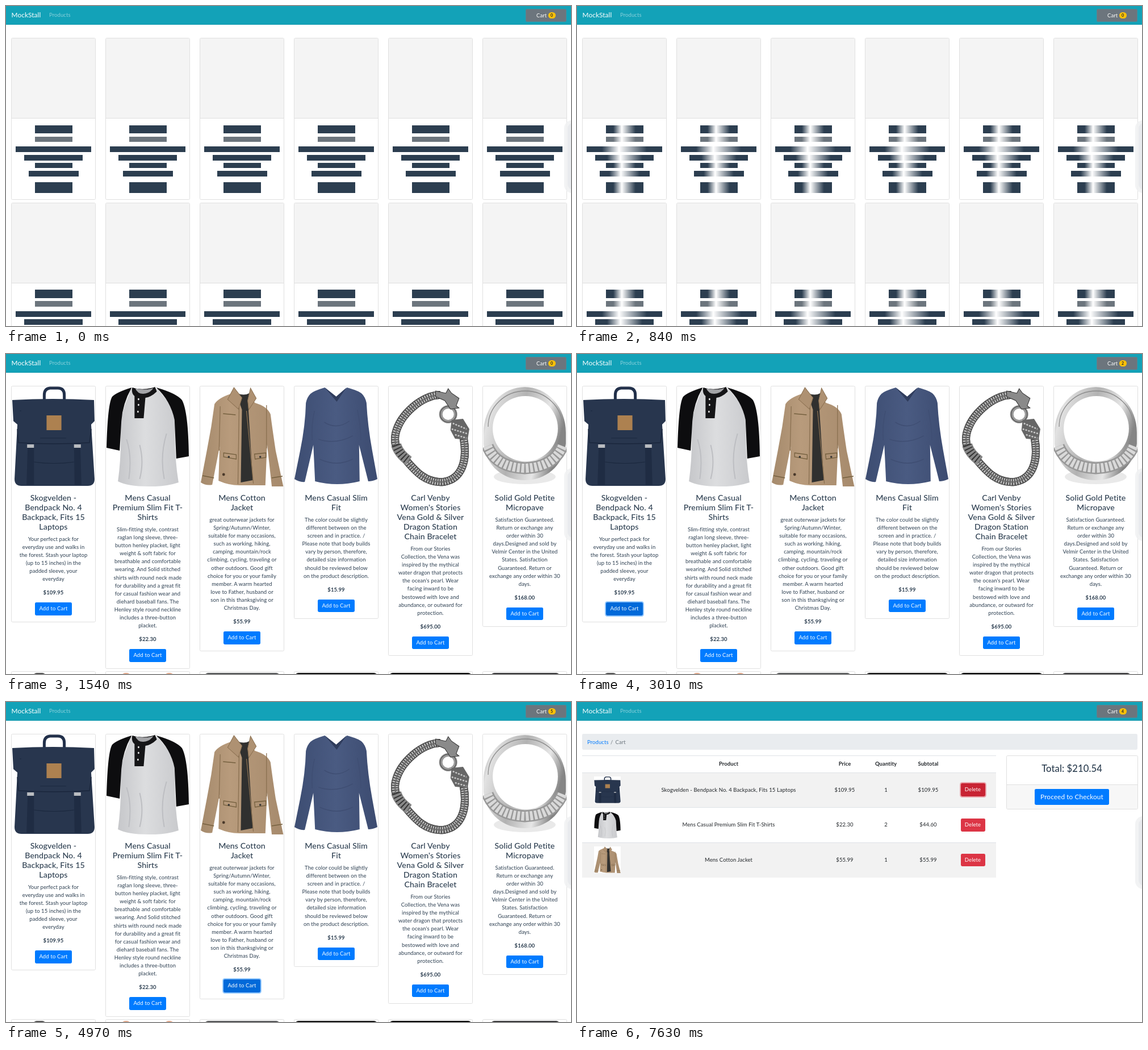
An HTML page that plays this animation: 995x563 px, repeating every 8 s.

```html
<!DOCTYPE html>
<html lang="en">
<head>
<meta charset="utf-8">
<title>Shop demo</title>
<style>
html, body { margin: 0; width: 100%; height: 100%; overflow: hidden; background: #fff; }
body { position: relative; font: 9.47px/14.1px Lato, "Open Sans", sans-serif; letter-spacing: .01em; color: #2c3e50; }
body *, body *::after { box-sizing: border-box; }
.at, .view, .card, .photo, .bar { position: absolute; }
.at { white-space: pre; }
.mid { text-align: center; }
.bold { font-weight: bold; }
.view { inset: 0; }

/* navigation */
#nav { left: 0; top: 0; width: 100%; height: 33px; background: #13a2b8; border-bottom: 1px solid #1699ad; }
#brand { left: 9.5px; top: 9px; font-size: 11.84px; color: #fff; }
#link { left: 76px; top: 9px; color: rgba(255,255,255,.5); }
.btn { color: #fff; border-radius: 2.4px; text-align: center; white-space: pre; }
#cart { position: absolute; left: 915px; top: 5px; width: 72px; height: 23px; line-height: 21px; border: 1px solid #588592; background: #6c757d; animation: cartBtn 8s linear infinite; }
#cart span { position: absolute; left: 18px; }
#badge { position: absolute; left: 38.5px; top: 5px; width: 13px; height: 11px; overflow: hidden; border-radius: 6px; background: #ffc107; color: #212529; font: bold 7.1px/11px Lato, sans-serif; }
#badge div { white-space: pre; animation: count 8s step-end infinite; }
@keyframes count {
  0% { transform: translateY(0); }
  33.25% { transform: translateY(-11px); }
  35.875% { transform: translateY(-22px); }
  48.125% { transform: translateY(-33px); }
  50.75% { transform: translateY(-44px); }
  61.25% { transform: translateY(-55px); }
  93.625%, 100% { transform: translateY(-66px); }
}

/* the three screens */
#loading { animation: loading 8s step-end infinite; }
#shop { animation: shop 8s step-end infinite; }
#order { animation: order 8s step-end infinite; }
@keyframes loading { 0% { opacity: 1; } 14.875%, 100% { opacity: 0; } }
@keyframes shop { 0% { opacity: 0; } 14.875% { opacity: 1; } 76.125%, 100% { opacity: 0; } }
@keyframes order { 0% { opacity: 0; } 76.125%, 100% { opacity: 1; } }

/* cards */
.card { width: 149px; border: 1px solid #e0e0e0; border-radius: 2.4px; background: #fff; overflow: hidden; text-align: center; white-space: pre; }
.blank { position: absolute; left: 0; top: 0; width: 100%; height: 141px; background: #f4f4f4; border-bottom: 1px solid #dfdfdf; }
.bar { overflow: hidden; background: #2c3e50; }
.bar.grey { background: #6c757d; }
.bar::after { content: ""; position: absolute; top: 0; height: 100%; width: 60%; background: linear-gradient(90deg, rgba(255,255,255,0), #fff 38%, rgba(255,255,255,0)); animation: sweep 8s infinite; }
@keyframes sweep {
  0% { left: -60%; animation-timing-function: step-end; }
  5.25% { left: -55%; animation-timing-function: steps(11, end); }
  14.875%, 100% { left: 82.5%; }
}
.item { padding: 187px 0 11px; }
.item .photo { left: 0; top: 0; width: 147px; height: 176px; }
.item h4 { margin: 0 0 7px; font: 500 14.2px/17px Lato, "Open Sans", sans-serif; }
.item p { margin: 0 0 9.9px; }
.item .btn { display: inline-block; padding: 0 7.3px; height: 22.5px; line-height: 22.5px; background: #007bff; vertical-align: top; letter-spacing: .018em; }
.buy0 { animation: buy0 8s linear infinite; }
.buy1 { animation: buy1 8s linear infinite; }
.buy2 { animation: buy2 8s linear infinite; }
@keyframes buy0 {
  0%, 28% { background: #007bff; box-shadow: 0 0 0 0 rgba(38,143,255,.5); }
  29.75%, 32.375% { background: #0069d9; box-shadow: 0 0 0 0 rgba(38,143,255,.5); }
  34.25%, 38.5% { background: #0069d9; box-shadow: 0 0 0 1.9px rgba(38,143,255,.5); }
  39.375%, 47.25% { background: #007bff; box-shadow: 0 0 0 1.9px rgba(38,143,255,.5); }
  49.125%, 100% { background: #007bff; box-shadow: 0 0 0 0 rgba(38,143,255,.5); }
}
@keyframes buy1 {
  0%, 42% { background: #007bff; box-shadow: 0 0 0 0 rgba(38,143,255,.5); }
  43.75%, 47.25% { background: #0069d9; box-shadow: 0 0 0 0 rgba(38,143,255,.5); }
  49.125%, 51.625% { background: #0069d9; box-shadow: 0 0 0 1.9px rgba(38,143,255,.5); }
  52.5%, 60.375% { background: #007bff; box-shadow: 0 0 0 1.9px rgba(38,143,255,.5); }
  62.125%, 100% { background: #007bff; box-shadow: 0 0 0 0 rgba(38,143,255,.5); }
}
@keyframes buy2 {
  0%, 56% { background: #007bff; box-shadow: 0 0 0 0 rgba(38,143,255,.5); }
  57.75%, 60.375% { background: #0069d9; box-shadow: 0 0 0 0 rgba(38,143,255,.5); }
  62.125%, 74.375% { background: #0069d9; box-shadow: 0 0 0 1.9px rgba(38,143,255,.5); }
  76.125%, 100% { background: #007bff; box-shadow: 0 0 0 0 rgba(38,143,255,.5); }
}
@keyframes cartBtn {
  0%, 74.375% { background: #6c757d; box-shadow: 0 0 0 0 rgba(130,138,145,.5); }
  76.125%, 80.5% { background: #5a6268; box-shadow: 0 0 0 1.9px rgba(130,138,145,.5); }
  82.25%, 92.75% { background: #6c757d; box-shadow: 0 0 0 1.9px rgba(130,138,145,.5); }
  94.5%, 100% { background: #6c757d; box-shadow: 0 0 0 0 rgba(130,138,145,.5); }
}

/* cart screen */
#order { color: #212529; }
#crumbs { left: 9px; top: 56px; width: 978px; height: 28px; border-radius: 2.4px; background: #e9ecef; }
.row { left: 9px; width: 729px; height: 62px; border-top: 1px solid #dee2e6; }
.odd { background: #f2f2f2; }
.del { position: absolute; left: 675.5px; width: 43px; height: 22.5px; line-height: 22.5px; background: #dc3545; }
.del0 { animation: del0 8s linear infinite; }
@keyframes del0 {
  0%, 84% { background: #dc3545; box-shadow: 0 0 0 0 rgba(225,83,97,.5); }
  85.75%, 92.75% { background: #c82333; box-shadow: 0 0 0 0 rgba(225,83,97,.5); }
  94.5%, 100% { background: #c82333; box-shadow: 0 0 0 1.9px rgba(225,83,97,.5); }
}
.was { animation: was 8s step-end infinite; }
.now { animation: now 8s step-end infinite; }
@keyframes was { 0% { opacity: 1; } 93.625%, 100% { opacity: 0; } }
@keyframes now { 0% { opacity: 0; } 93.625%, 100% { opacity: 1; } }
#sum { left: 756px; top: 94px; width: 232px; height: 95px; border: 1px solid #dfdfdf; border-radius: 2.4px; overflow: hidden; }
#sum div { position: absolute; left: 0; top: 50px; width: 100%; height: 44px; background: #f7f7f7; border-top: 1px solid #dfdfdf; }
.total { font-size: 16.6px; font-weight: 500; color: #2c3e50; }
#pay { position: absolute; left: 806px; top: 153px; width: 131px; height: 28.4px; line-height: 28px; font-size: 11.84px; background: #007bff; }

/* panel peeking in from the right edge */
#edge { left: 983px; top: 201px; width: 30px; height: 128px; border-radius: 14px; background: rgba(240,241,242,.85); }
#edge::after { content: ""; position: absolute; left: 6px; top: 5px; width: 30px; height: 117px; border-radius: 9px; background: #e9ebee; }
</style>
</head>
<body>
<svg width="0" height="0" style="position:absolute">
  <defs>
    <linearGradient id="silver" x1="0" x2="1" y1="0" y2=".3">
      <stop offset="0" stop-color="#8d8d8d"/><stop offset=".15" stop-color="#e2e2e2"/><stop offset=".5" stop-color="#b2b2b2"/>
      <stop offset=".8" stop-color="#e6e6e6"/><stop offset="1" stop-color="#858585"/>
    </linearGradient>
    <linearGradient id="cloth" x1="0" x2="1">
      <stop offset="0" stop-color="#c6c7ca"/><stop offset=".45" stop-color="#dcdddf"/><stop offset="1" stop-color="#c9cacd"/>
    </linearGradient>
    <linearGradient id="blue" x1="0" x2="1">
      <stop offset="0" stop-color="#3d4d72"/><stop offset=".5" stop-color="#4a5b82"/><stop offset="1" stop-color="#3c4b70"/>
    </linearGradient>
    <linearGradient id="tan" x1="0" x2="1">
      <stop offset="0" stop-color="#a58a6c"/><stop offset=".35" stop-color="#b89b7c"/><stop offset="1" stop-color="#a68a6c"/>
    </linearGradient>
    <symbol id="p0" viewBox="10 57 146 176" preserveAspectRatio="none">
      <path d="M67 84V72q0-11 10-12h14q11 0 11 12v12" fill="none" stroke="#22304a" stroke-width="5"/>
      <path d="M11 81q71-4 143 0l1 37-6 6 6 96q0 12-12 12H27q-12 0-12-12l5-96-7-6z" fill="#28364e"/>
      <path d="M20 132l2 24q60 4 124 0l3-24" fill="none" stroke="#1a263c" stroke-width="1.5"/>
      <path d="M38 160h11v70H36zM119 160h11l2 70h-12z" fill="#1f2c43"/>
      <path d="M49 190q35 5 70 0M24 100h3M60 148h45" fill="none" stroke="#1b283e"/>
      <path d="M37 159h12v6H37zM119 159h12v6h-12z" fill="#b9bcc0"/>
      <rect x="71" y="108" width="26" height="26" fill="#ad8150"/>
    </symbol>
    <symbol id="p1" viewBox="176 57 146 176" preserveAspectRatio="none">
      <path d="M220 61q20 10 46 0l22 27 9 30q-2 60 6 108-24 8-53 7-36 0-53-9 7-50 4-106l8-28z" fill="url(#cloth)"/>
      <path d="M221 59q-26 8-34 16-8 12-10 90l23 5 3-52q2-30 18-59zM264 59q35 10 45 22 11 20 12 99l-22 4-3-68q-7-34-32-57z" fill="#0d0d0f"/>
      <path d="M222 59q18 6 40-1l3 8q-10 10-20 11l-3 36h-16V74q-6-5-4-15z" fill="#151517"/>
      <path d="M227 60q16 5 32 0-6 9-18 10-10 0-14-10z" fill="#a4a5a8"/>
      <path d="M233 79v1M233 89v1M232 101v1" stroke="#eee" stroke-width="2.5" stroke-linecap="round"/>
      <path d="M212 150q10 30 4 70M282 140q-12 40-4 80M235 160q8 30 0 60" fill="none" stroke="#bdbec2" stroke-width="2"/>
    </symbol>
    <symbol id="p2" viewBox="342 57 146 176" preserveAspectRatio="none">
      <path d="M396 70q-22 7-29 18-5 40-13 80l-11 58q9 6 20 4l13-67-2 60q18 8 36 8h46l3-72 9 81q11 2 20-4l-14-66q-6-40-9-64-6-14-27-20l-9-10q-18-4-33-6z" fill="url(#tan)"/>
      <path d="M405 68q13 7 25 0l-4 24 8 130-21 4 2-128z" fill="#30302f"/>
      <path d="M401 59l-11 21 19 17 6-20zM430 60l10 18-13 20-2-16z" fill="#ae9172" stroke="#8c7152"/>
      <path d="M377 92l-2 78M458 90v76M423 100l12 128M410 94l-2 135" fill="none" stroke="#8a7051" stroke-width="1.3"/>
      <path d="M382 105l22 2M383 174l22 3v8l-22-4zM437 176l20-2v8l-19 3zM346 214l20 4M467 218l19-3" fill="none" stroke="#75603f" stroke-width="1.3"/>
      <circle cx="392" cy="181" r="1.8" fill="#333"/><circle cx="447" cy="181" r="1.8" fill="#333"/><circle cx="383" cy="212" r="2.4" fill="#4a392a"/>
    </symbol>
    <symbol id="p3" viewBox="508 57 146 176" preserveAspectRatio="none">
      <path d="M561 59q-20 6-25 11-6 6-8 16-1 40-10 84l-10 50q9 6 18 5l15-65 3 64q38 10 78 0l-1-64 16 64q8 0 16-4l-9-50q-8-44-10-84-2-10-8-16-5-5-26-11l-19 16z" fill="url(#blue)"/>
      <path d="M561 59l20 16 18-16-17 25z" fill="#303d5d"/>
      <path d="M543 100q-6 26-4 52M618 98q6 28 6 54M550 150q30 10 60-6M552 185q30 14 58 0M560 120q22 14 44-2" fill="none" stroke="#3f4e73" stroke-width="1.5"/>
    </symbol>
    <symbol id="p4" viewBox="674 57 146 176" preserveAspectRatio="none">
      <g fill="none">
        <path id="chain" d="M764 72c-30 0-70 33-78 68-4 20 4 32 14 42 16 18 35 46 70 43 32-5 42-37 35-77" stroke="#4f4f4f" stroke-width="14"/>
        <use href="#chain" style="stroke:#bbb"/>
        <path d="M764 72c-30 0-70 33-78 68-4 20 4 32 14 42 16 18 35 46 70 43 32-5 42-37 35-77" stroke="#bdbdbd" stroke-width="11" stroke-dasharray="2.2 2"/>
        <path d="M764 72c-30 0-70 33-78 68-4 20 4 32 14 42 16 18 35 46 70 43 32-5 42-37 35-77" stroke="#6a6a6a" stroke-width="2"/>
        <path d="M687 160q5 16 22 28" stroke="#888" stroke-width="18"/>
        <path d="M687 160q5 16 22 28" stroke="#333" stroke-width="15" stroke-dasharray="2 4"/>
        <circle cx="778" cy="106" r="13" stroke="#999" stroke-width="6"/>
        <circle cx="778" cy="106" r="14" stroke="#444"/>
      </g>
      <path d="M756 65l18 4 4-8 6 8 13 9-5 13 5 4-15 2-10-15-16-7z" fill="#8a8a8a" stroke="#333"/>
      <path d="M784 116l20-2 11 18-3 19-22-2-8-15z" fill="#666"/>
      <path d="M786 122l24 10M784 132l27 8M790 142l20 6" stroke="#c9c9c9" stroke-width="2.5" stroke-dasharray="3 2"/>
    </symbol>
    <symbol id="p5" viewBox="840 57 146 176" preserveAspectRatio="none">
      <ellipse cx="913" cy="216" rx="54" ry="13" fill="#e9e9e9"/>
      <path fill-rule="evenodd" d="M841 138a72 80 0 0 1 144 0v20c-5 40-36 64-72 64s-68-24-72-64zM857 131a57 58 0 0 0 114 0 57 57 0 0 0-114 0z" fill="url(#silver)"/>
      <path d="M849 128a65 63 0 0 1 130 0" fill="none" stroke="#8c8c8c" stroke-width="1.3"/>
      <path d="M848 162q14 37 65 39 51-2 66-39" fill="none" stroke="#989898" stroke-width="21"/>
      <path d="M848 162q14 37 65 39 51-2 66-39" fill="none" stroke="#d9d9d9" stroke-width="16" stroke-dasharray="5 2.5"/>
    </symbol>
  </defs>
</svg>

<div id="loading" class="view"></div>
<div id="shop" class="view"></div>
<div id="order" class="view"></div>
<div id="nav" class="at"></div>
<div id="brand" class="at">MockStall</div>
<div id="link" class="at">Products</div>
<div id="cart" class="btn"><span>Cart</span><div id="badge"><div>0
1
2
3
4
5
4</div></div></div>
<div id="edge" class="at"></div>

<script>
const $ = id => document.getElementById(id);
const colX = i => 9 + 166 * i;
const photo = (i, style = '') => `<svg class="photo" style="${style}"><use href="#p${i}" width="100%" height="100%"/></svg>`;

// Loading cards: bar width, top, height
const bars = [[66, 153, 14.5], [66, 173, 9.5], [132.5, 190.5, 10], [103, 205, 10], [66, 219, 9.5], [88, 233, 10], [66, 253, 19]];
const barHtml = ([w, y, h], i) =>
  `<div class="bar${i === 1 ? ' grey' : ''}" style="left:${73.7 - w / 2}px;top:${y - .5}px;width:${w}px;height:${h}px"></div>`;
const blankCard = (x, y) =>
  `<div class="card" style="left:${x}px;top:${y}px;height:285px"><div class="blank"></div>${bars.map(barHtml).join('')}</div>`;
for (let n = 0; n < 12; n++)
  $('loading').innerHTML += blankCard(colX(n % 6), n < 6 ? 56 : 345.5);

const items = [
  ['Skogvelden -\nBendpack No. 4\nBackpack, Fits 15\nLaptops',
   'Your perfect pack for\neveryday use and walks in\nthe forest. Stash your laptop\n(up to 15 inches) in the\npadded sleeve, your\neveryday', '109.95'],
  ['Mens Casual\nPremium Slim Fit T-\nShirts',
   'Slim-fitting style, contrast\nraglan long sleeve, three-\nbutton henley placket, light\nweight &amp; soft fabric for\nbreathable and comfortable\nwearing. And Solid stitched\nshirts with round neck made\nfor durability and a great fit\nfor casual fashion wear and\ndiehard baseball fans. The\nHenley style round neckline\nincludes a three-button\nplacket.', '22.30'],
  ['Mens Cotton\nJacket',
   'great outerwear jackets for\nSpring/Autumn/Winter,\nsuitable for many occasions,\nsuch as working, hiking,\ncamping, mountain/rock\nclimbing, cycling, traveling or\nother outdoors. Good gift\nchoice for you or your family\nmember. A warm hearted\nlove to Father, husband or\nson in this thanksgiving or\nChristmas Day.', '55.99'],
  ['Mens Casual Slim\nFit',
   'The color could be slightly\ndifferent between on the\nscreen and in practice. /\nPlease note that body builds\nvary by person, therefore,\ndetailed size information\nshould be reviewed below\non the product description.', '15.99'],
  ["Carl Venby\nWomen's Stories\nVena Gold &amp; Silver\nDragon Station\nChain Bracelet",
   "From our Stories\nCollection, the Vena was\ninspired by the mythical\nwater dragon that protects\nthe ocean's pearl. Wear\nfacing inward to be\nbestowed with love and\nabundance, or outward for\nprotection.", '695.00'],
  ['Solid Gold Petite\nMicropave',
   'Satisfaction Guaranteed.\nReturn or exchange any\norder within 30\ndays.Designed and sold by\nVelmir Center in the United\nStates. Satisfaction\nGuaranteed. Return or\nexchange any order within 30\ndays.', '168.00']
];

// Tops of the next row's pictures: [left, width, colour] inside the card
const peeks = [[[38, 22, '#555']], [[28, 15, '#e0a98c'], [104, 15, '#e0a98c']], [[8, 132, '#56585a']],
  [[1, 145, '#111']], [[1, 145, '#050505']], [[14, 121, '#3a3a3c']]];

$('shop').innerHTML = items.map(([name, text, price], i) =>
  `<div class="card item" style="left:${colX(i)}px;top:56px">${photo(i)}<h4>${name}</h4><p>${text}</p>` +
  `<p class="bold">$${price}</p><div class="btn buy${i}">Add to Cart</div></div>` +
  `<div class="card" style="left:${colX(i)}px;top:558px;height:200px">` +
  peeks[i].map(([x, w, c]) => `<div class="at" style="left:${x}px;top:1.5px;width:${w}px;height:90px;border-radius:6px 6px 0 0;background:${c}"></div>`).join('') +
  '</div>').join('');

// Text centred on (x, y)
const label = (x, y, text, cls = '') =>
  `<div class="at mid ${cls}" style="left:${x - 150}px;top:${y - 7}px;width:300px">${text}</div>`;
const swap = (x, y, a, b, cls = '') => label(x, y, a, cls + ' was') + label(x, y, b, cls + ' now');

const cartRow = (i, name, qty, sub) => {
  const y = 154.5 + 61.7 * i, price = '$' + items[i][2];
  const cell = (x, v) => Array.isArray(v) ? swap(x, y, ...v) : label(x, y, v);
  return `<div class="at row${i % 2 ? '' : ' odd'}" style="top:${y - 31}px"></div>` +
    photo(i, `left:29.5px;top:${y - 23.5}px;width:47px;height:47px;background:#fff`) +
    label(267, y, name) + label(471.5, y, price) + cell(544, qty) + cell(618.5, sub) +
    `<div class="btn del del${i}" style="top:${y - 11.2}px">Delete</div>`;
};

$('order').innerHTML =
  '<div id="crumbs" class="at"></div>' +
  '<div class="at" style="left:18px;top:63.5px;color:#007bff">Products</div>' +
  '<div class="at" style="left:59px;top:63.5px;color:#6c757d">/</div>' +
  '<div class="at" style="left:67.5px;top:63.5px;color:#6c757d">Cart</div>' +
  '<div class="at row" style="top:94px;height:29px"></div>' +
  [[267, 'Product'], [471.5, 'Price'], [544, 'Quantity'], [618.5, 'Subtotal']].map(([x, s]) => label(x, 108.5, s, 'bold')).join('') +
  cartRow(0, 'Skogvelden - Bendpack No. 4 Backpack, Fits 15 Laptops', ['2', '1'], ['$219.90', '$109.95']) +
  cartRow(1, 'Mens Casual Premium Slim Fit T-Shirts', '2', '$44.60') +
  cartRow(2, 'Mens Cotton Jacket', '1', '$55.99') +
  '<div id="sum" class="at"><div></div></div>' +
  swap(871.5, 117, 'Total: $320.49', 'Total: $210.54', 'total') +
  '<div id="pay" class="btn">Proceed to Checkout</div>';
</script>
</body>
</html>
```
